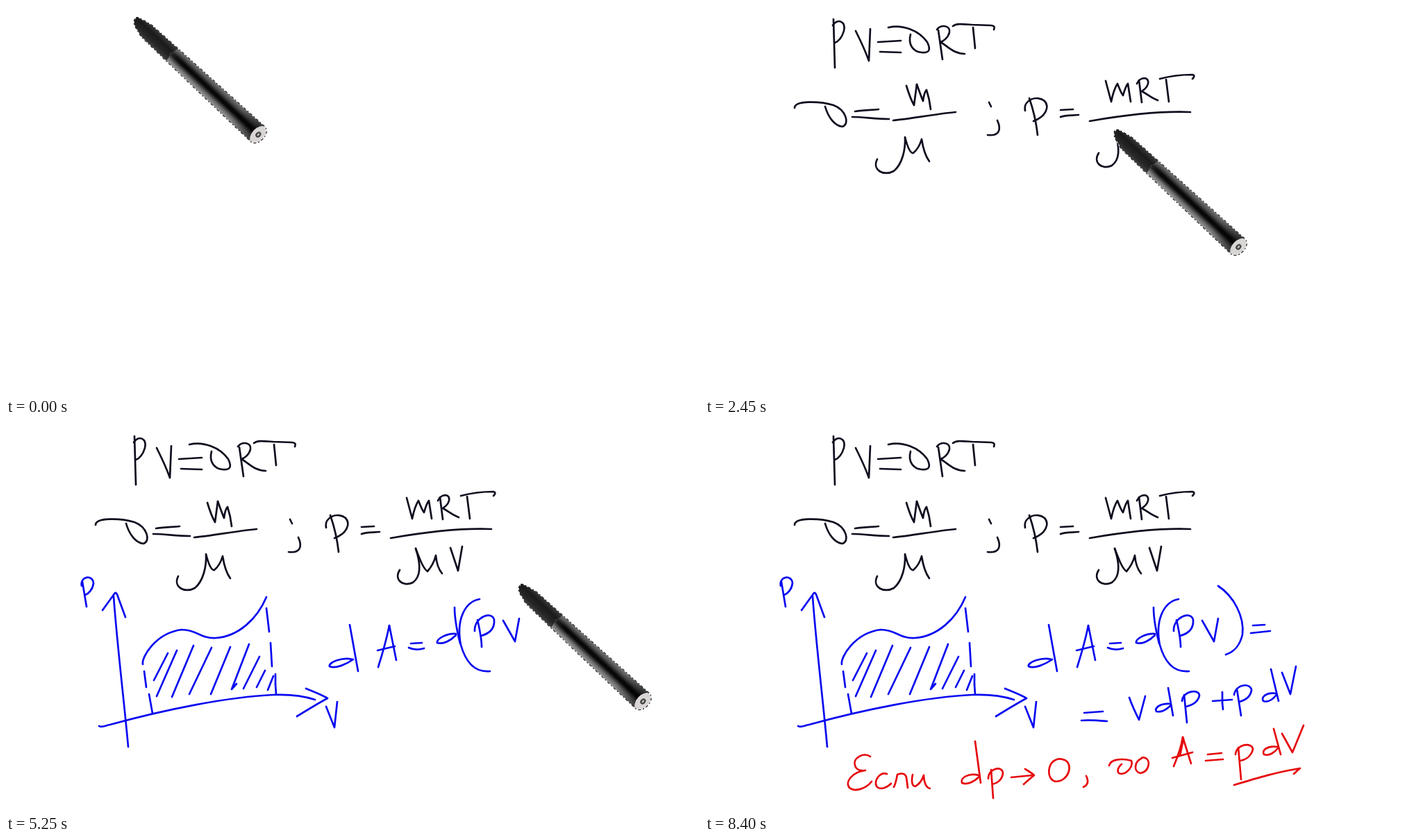
These frames come from a looping animation (998x561 px, 9940 ms). An HTML page with a canvas:

```html
<!DOCTYPE html>
<html lang="ru">
<head>
<meta charset="utf-8">
<title>Handwritten gas law</title>
<style>
html, body { margin: 0; width: 100%; height: 100%; overflow: hidden; background: #fff; }
canvas { display: block; }
</style>
</head>
<body>
<canvas id="board" width="998" height="561"></canvas>
<script>
const ctx = document.getElementById('board').getContext('2d');
const STEP = 70, LOOP = 9940, LAST = 120;
const BLACK = '#0d0d1e', BLUE = '#0808f0', RED = '#e6080c';

// Each phase is written between two steps; every "M" starts a new pen stroke.
const phases = [];
let prev = 0;
function write(until, color, ...marks) {
  const strokes = marks.join('').match(/M[^M]+/g).map(d => {
    const el = document.createElementNS('http://www.w3.org/2000/svg', 'path');
    el.setAttribute('d', d);
    return { el, color, path: new Path2D(d), len: el.getTotalLength() };
  });
  const total = strokes.reduce((sum, s) => sum + s.len, 0);
  phases.push({ from: prev, to: until, strokes, total });
  prev = until;
}

// PV = vRT, v =
write(16, BLACK,
  'M185 19L187 89M184 28C190 17 204 22 200 36C197 46 192 51 187 53',
  'M217 36C224 50 231 65 236 79L238 33',
  'M249 52L282 50M252 66L282 67',
  'M264 31C284 26 308 35 320 52C326 64 322 68 312 67C300 66 292 56 296 41',
  'M336 35L342 77M334 34C340 26 354 28 352 38C350 46 343 51 339 52C350 58 356 68 374 69',
  'M357 29C362 25 370 26 385 27L412 28C418 29 417 31 416 34M386 31L389 61',
  'M129 147C129 136 165 137 185 143C203 150 209 170 198 174C186 173 177 159 173 145',
  'M216 152C228 150 240 150 250 149M212 160C228 160 245 163 265 163',
  'M290 115C293 125 297 136 301 143L305 113');
// m / mu ; P = m
write(30, BLACK,
  'M305 113C308 121 311 130 314 137C315 129 317 123 319 121C322 130 324 140 325 149',
  'M271 165C295 163 330 156 361 153',
  'M248 221C240 237 258 246 272 238C284 228 289 207 288 189',
  'C292 205 296 213 300 212C306 207 310 199 312 192C314 205 317 216 323 224',
  'M409 139L412 145M421 165C427 178 424 188 407 186',
  'M467 133C473 150 477 168 479 186M461 151C458 135 478 128 489 137C497 146 490 160 473 166',
  'M512 150L530 149M512 160C520 157 530 158 538 157',
  'M577 108L585 138C587 128 590 118 594 112C597 120 599 125 602 129C604 122 606 115 609 112L613 138');
// RT and the fraction line
write(35, BLACK,
  'M625 107L629 139M622 112C626 102 640 101 638 112C636 119 632 121 629 123C637 127 643 133 652 136',
  'M655 105C670 101 690 99 702 99C706 100 704 103 702 105M664 106L668 138',
  'M554 166C600 158 650 151 699 153',
  'M567 212C558 226 572 237 586 230C597 222 598 205 590 181');
write(37, BLACK,
  'M590 181C596 197 601 210 607 214C613 207 617 199 619 191C620 203 623 211 628 217',
  'M640 180L651 213L657 178');
// Axes, curve and dashed bounds
write(49, BLUE,
  'M155 250C160 320 170 400 176 467M139 270L157 245C158 244 160 246 161 250L172 280',
  'M134 437C138 440 144 436 150 435C230 413 320 395 385 392C410 391 430 394 445 399',
  'M432 383C444 388 455 392 463 397C450 404 432 415 419 423',
  'M197 348C195 338 215 303 253 298C275 298 280 311 302 310C335 308 362 282 375 251',
  'M199 358L202 381M206 391L211 419M375 267L379 301M381 317L383 351M388 362L388 377');
// Hatching and axis labels
write(60, BLUE,
  'M388 377L389 391',
  'M233 332L213 371M246 328L217 394M270 321L239 395M296 324L264 391M323 323L295 391',
  'M350 319L325 384L332 376M365 337L342 383M373 357L361 381M385 365L377 385',
  'M461 409L473 439L477 402',
  'M110 229L116 265M109 235C106 221 125 218 126 231C125 240 119 246 114 248');
// A =
write(64, BLUE,
  'M552 292C548 312 542 333 536 352M552 292L562 342M535 328L560 322',
  'M583 318L599 317');
// d, d(pV
write(75, BLUE,
  'M580 324C588 328 595 327 602 325',
  'M679 284C682 297 685 311 685 323M675 300C674 280 700 270 703 284C704 297 695 304 684 307',
  'M716 285L733 315L739 282',
  'M499 341C485 337 464 345 466 351C474 355 490 348 500 341M495 291L507 358',
  'M648 304C635 303 620 311 621 317C630 320 641 313 648 306M646 266C646 285 650 302 654 318',
  'M682 254C660 258 648 285 655 320C662 345 675 360 697 358');
// ) = = V dp +
write(85, BLUE,
  'M739 235C762 250 777 280 774 305C770 322 762 330 750 334',
  'M789 292L806 291M786 303L814 300',
  'M546 418L573 416M542 429C555 428 566 429 579 430',
  'M611 396C616 410 621 420 625 428L634 394',
  'M670 405C655 404 647 411 650 416C658 418 666 412 671 407M667 382L674 422',
  'M690 392L694 432M687 401C688 386 712 383 712 393C710 403 701 407 693 409',
  'M731 401L759 399M745 388L745 404');
// p dV
write(91, BLUE,
  'M745 404L746 413',
  'M766 384L772 422M762 392C764 376 787 374 787 386C785 396 777 400 770 402',
  'M822 390C808 388 800 396 804 401C812 404 819 397 823 392M815 355L826 401',
  'M831 360L843 391L851 351');
// Condition
write(104, RED,
  'M238 481C228 474 212 484 216 494C218 501 226 502 231 501C212 503 201 518 208 526C216 533 232 527 240 517',
  'M262 506C252 503 243 515 247 524C252 530 262 526 268 520',
  'M272 525C275 519 276 512 277 507C284 504 289 506 290 511L292 526',
  'M299 507C297 517 298 524 303 524C310 520 313 514 315 508C315 517 318 526 324 527',
  'M394 508C380 504 367 512 370 519C378 523 389 516 395 510M389 459L397 519',
  'M412 500L415 541M408 513C408 497 429 494 429 505C428 515 420 520 414 521',
  'M441 511L472 508M461 499C466 502 471 505 474 508C468 513 463 517 459 521');
// Conclusion
write(LAST, RED,
  'M505 486C493 490 491 514 505 517C524 517 531 492 518 486C513 484 508 484 505 486',
  'M549 509C553 517 551 522 545 525',
  'M582 494C584 485 600 483 614 487C617 495 608 506 599 506C592 505 594 497 600 492',
  'M628 484C618 489 617 503 627 505C639 503 643 487 634 483C631 482 629 482 628 484',
  'M688 453C686 468 680 483 675 495M688 453L700 491M673 483L702 475M689 455L684 480',
  'M724 478L744 476M721 487L746 485',
  'M768 468L772 514M764 478C765 462 789 460 789 471C786 482 777 486 771 487',
  'M824 467C810 465 801 472 805 478C813 481 821 474 825 469M819 441L829 478',
  'M831 448L846 475L862 436',
  'M762 522C795 512 825 503 857 498C853 501 850 504 848 506');

function gradient(x0, y0, x1, y1, ...stops) {
  const g = ctx.createLinearGradient(x0, y0, x1, y1);
  for (const [at, color] of stops) g.addColorStop(at, color);
  return g;
}

const nib = new Path2D('M0 -3Q1 -6 7 -7L24 -11L75 -12L72 0L75 13L24 12L7 7Q0 4 0 -3Z');
const barrel = new Path2D('M75 -12L243 -15L243 15L75 13Q69 0 75 -12Z');
const edge = new Path2D('M0 -3Q1 -6 7 -7L24 -11L75 -12L243 -15Q253 -13 253 0Q253 13 243 15L75 13L24 12L7 7Q0 4 0 -3Z');
const nibFill = gradient(0, -12, 0, 13, [0, '#3c3c3c'], [.35, '#1a1a1a'], [.7, '#262626'], [1, '#404040']);
const barrelFill = gradient(0, -14, 0, 14,
  [0, '#858585'], [.22, '#545454'], [.43, '#080808'], [.56, '#0a0a0a'], [.8, '#777'], [1, '#a8a8a8']);
const shade = gradient(70, 0, 243, 0,
  [0, 'rgba(255,255,255,.15)'], [.15, 'rgba(0,0,0,0)'], [.75, 'rgba(0,0,0,.1)'], [1, 'rgba(0,0,0,.65)']);

function ellipse(x, rx, ry, fill) {
  ctx.fillStyle = fill;
  ctx.beginPath();
  ctx.ellipse(x, 0, rx, ry, 0, 0, 7);
  ctx.fill();
}

function drawPen({ x, y }) {
  ctx.save();
  ctx.translate(x, y);
  ctx.rotate(.751);
  ctx.fillStyle = barrelFill;
  ctx.fill(barrel);
  ctx.fillStyle = shade;
  ctx.fill(barrel);
  ctx.fillStyle = nibFill;
  ctx.fill(nib);
  ellipse(244, 9, 15, '#d9d5d4');
  ellipse(244, 3.5, 4.5, '#3c3c3c');
  ellipse(244, 1.6, 2.4, '#b5b1b0');
  ctx.lineWidth = 1;
  ctx.lineCap = 'butt';
  ctx.strokeStyle = '#fff';
  ctx.stroke(edge);
  ctx.strokeStyle = '#000';
  ctx.setLineDash([4, 3, 2, 3]);
  ctx.stroke(edge);
  ctx.restore();
}

function draw(step) {
  ctx.fillStyle = '#fff';
  ctx.fillRect(0, 0, 998, 561);
  ctx.lineWidth = 2.7;
  ctx.lineCap = ctx.lineJoin = 'round';
  let tip;
  for (const { from, to, strokes, total } of phases) {
    if (step < from) break;
    let left = total * Math.min(1, (step - from) / (to - from));
    for (const { el, path, len, color } of strokes) {
      if (left < 0) break;
      const part = Math.min(left, len);
      tip = el.getPointAtLength(part);
      left -= len;
      if (!part) continue;
      ctx.strokeStyle = color;
      ctx.setLineDash(part < len ? [part, 2000] : []);
      ctx.stroke(path);
    }
  }
  ctx.setLineDash([]);
  if (step < LAST) drawPen(tip);
}

const start = performance.now();
function tick() {
  const t = (performance.now() - start) % LOOP;
  draw(Math.min(LAST, Math.floor(t / STEP)));
  requestAnimationFrame(tick);
}
tick();
</script>
</body>
</html>
```
